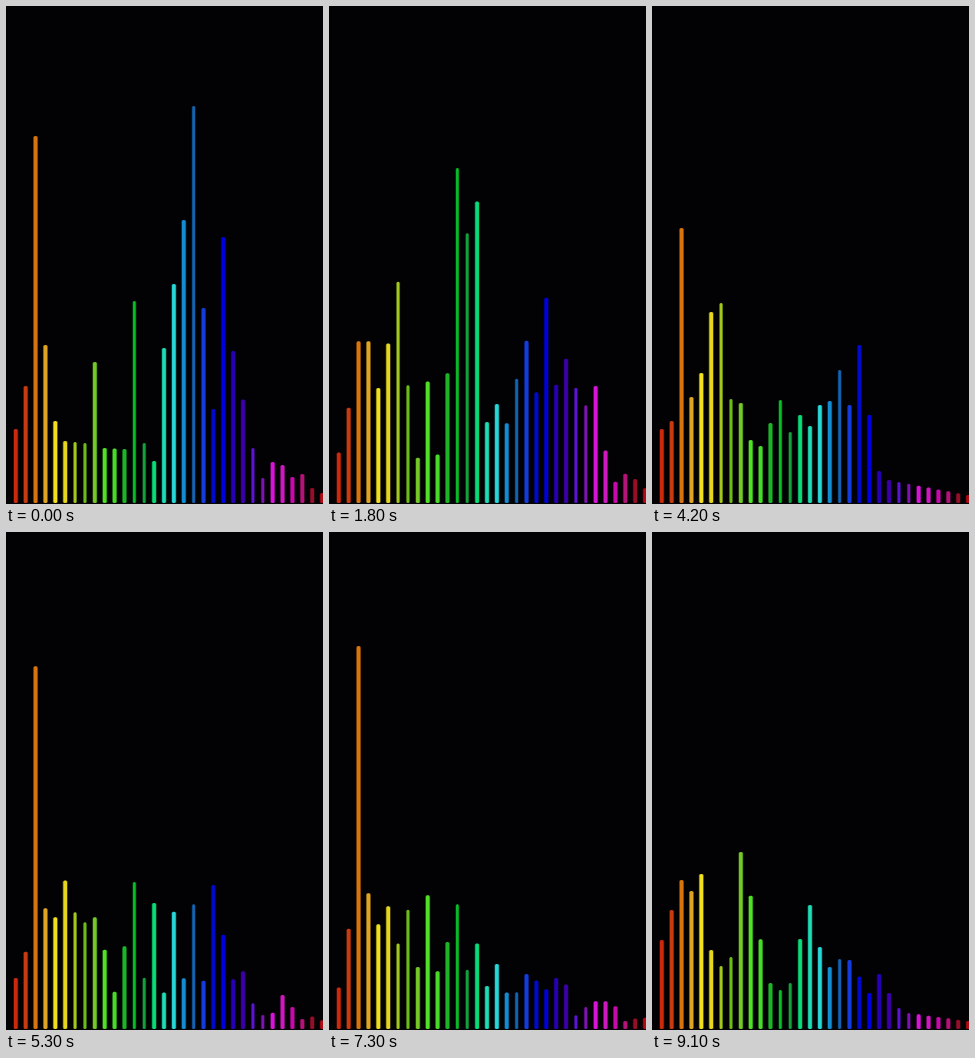
An HTML page that plays this animation: 317 by 498 pixels, repeating every 9200 ms.

```html
<!DOCTYPE html>
<html lang="en">
<head>
<meta charset="utf-8">
<title>Spectrum</title>
<style>
  html, body { margin: 0; width: 100%; height: 100%; overflow: hidden; background: #020104; }
  svg { display: block; width: 317px; height: 498px; }
</style>
</head>
<body>
<svg id="stage" viewBox="0 0 317 498"></svg>
<script>
const LOOP = 9200, STEP = 100, TICKS = LOOP / STEP;
const BARS = 32, BASE = 497, FULL = 397, FLOOR = 8;
const LEFT = 9.8, PITCH = 9.88;
const NS = 'http://www.w3.org/2000/svg';

const COLORS = ('#cc2a0c #c63c10 #d8740e #e0a424 #f0e01e #e6d61e #a2c81e #6cbc18 ' +
  '#74c828 #50e028 #48da28 #1eb428 #0abe28 #14a03c #0adc78 #1edcb4 ' +
  '#28d7d7 #148cd2 #1464b4 #143cdc #000ac8 #0000dc #2800b4 #3c00aa ' +
  '#5a14d2 #7d14af #d714d7 #cd19be #c80aaa #b41478 #960f28 #b40a14').split(' ');
const THIN = new Set([6, 7, 12, 13, 18, 24, 25]);

// A gap is filled on a straight line; a short list falls to FLOOR at the last bar.
const _ = null;
function pose(tick, points) {
  const heights = [];
  const known = points.map((h, i) => [i, h]).filter(p => p[1] !== _);
  if (points.length < BARS) known.push([BARS - 1, FLOOR]);
  for (let k = 0; k + 1 < known.length; k++) {
    const [a, ha] = known[k], [b, hb] = known[k + 1];
    for (let i = a; i <= b; i++) heights[i] = ha + (hb - ha) * (i - a) / (b - a);
  }
  return { tick, heights };
}

const opening = pose(0, [74, 117, 367, 158, 82, 62, _, 60, 141, 55, _, 54, 202, 60, 42, 155,
  _, 283, 397, 195, 94, 266, 152, _, 55, 25, 41, 38, 26, 29, 15, 10]);
const twinPeaks = pose(9, [22, 84, 377, 179, 148, 95, 192, 75, 74, 182, 69, 141, 259, 108, 178, 100,
  63, 114, 101, 148, 257, 378, 106, 188, 157, 145, 152, 92, 32, 39, 32, 15]);
const limeSolo = pose(28, [97, 124, 137, 72, 95, 149, 397, 141, 67, 61, 37, 75, 240, 274, 257, 110,
  _, 92, 72, 208, 171, 172, 80, 79, 23, 28, 51, 24]);
const lowHills = pose(42, [74, 82, 275, 106, 130, 191, 200, 104, 100, 63, 57, _, 103, 71, 88, 77,
  98, 102, 133, 98, 158, 88, 32, 23]);
const orangeSolo = pose(65, [82, 147, 342, 85, 68, 93, 77, 107, 58, _, 52, 176, 138, 88, 140, 61,
  66, 47, 60, 43, 40, 75, 89, 61, 22, 19, 25, 31, _, 10]);
const greenSpike = pose(81, [37, 115, 254, 144, _, 98, 106, 138, 76, 217, 92, 55, 87, 46, 78, 41,
  74, 55, _, 50, 60, _, 51, 26, 24, 16]);
const fading = pose(91, [89, _, 149, 138, 155, 79, 63, 72, 177, _, _, 46, 39, 46, 90, 124,
  82, 62, 70, 69, _, 36, 55, 36, 21, 16]);
const poses = [opening, twinPeaks, limeSolo, lowHills, orangeSolo, greenSpike, fading,
  { tick: TICKS, heights: opening.heights }];

// Repeatable random number in 0..1 for a pair of whole numbers.
function noise(a, b) {
  let n = Math.imul(a + 1, 374761393) ^ Math.imul(b + 7, 668265263);
  n = Math.imul(n ^ (n >>> 13), 1274126177);
  return ((n ^ (n >>> 16)) >>> 0) / 4294967296;
}

function spectrum(tick) {
  const next = poses.findIndex(p => p.tick > tick);
  const from = poses[next - 1], to = poses[next];
  const u = (tick - from.tick) / (to.tick - from.tick);
  const swing = u ? Math.min(1, 0.4 + Math.sin(Math.PI * u)) : 0;
  const heights = from.heights.map((h, i) => {
    const mid = h + (to.heights[i] - h) * u;
    return Math.min(FULL, mid * (1 + swing * (noise(tick, i) - 0.5)));
  });
  // One full-height beat per second.
  if (tick % 10 === 7) heights[heights.indexOf(Math.max(...heights))] = FULL;
  return heights;
}

const stage = document.getElementById('stage');
function addRect(x, width, fill, opacity) {
  const rect = document.createElementNS(NS, 'rect');
  const attrs = { x: x - width / 2, width, rx: 1.6, fill, opacity };
  for (const name in attrs) rect.setAttribute(name, attrs[name]);
  stage.append(rect);
  return rect;
}

const bars = COLORS.map((color, i) => {
  const x = LEFT + i * PITCH, width = THIN.has(i) ? 2.6 : 3.6;
  return [addRect(x, width + 1.4, color, 0.4), addRect(x, width, color, 1)];
});

function draw(tick) {
  spectrum(tick).forEach((h, i) => {
    for (const rect of bars[i]) {
      rect.setAttribute('y', BASE - h);
      rect.setAttribute('height', h);
    }
  });
}

const start = performance.now();
let shown = 0;
function frame() {
  const tick = Math.floor(((performance.now() - start) % LOOP) / STEP);
  if (tick !== shown) draw(shown = tick);
  requestAnimationFrame(frame);
}
draw(0);
requestAnimationFrame(frame);
</script>
</body>
</html>
```
